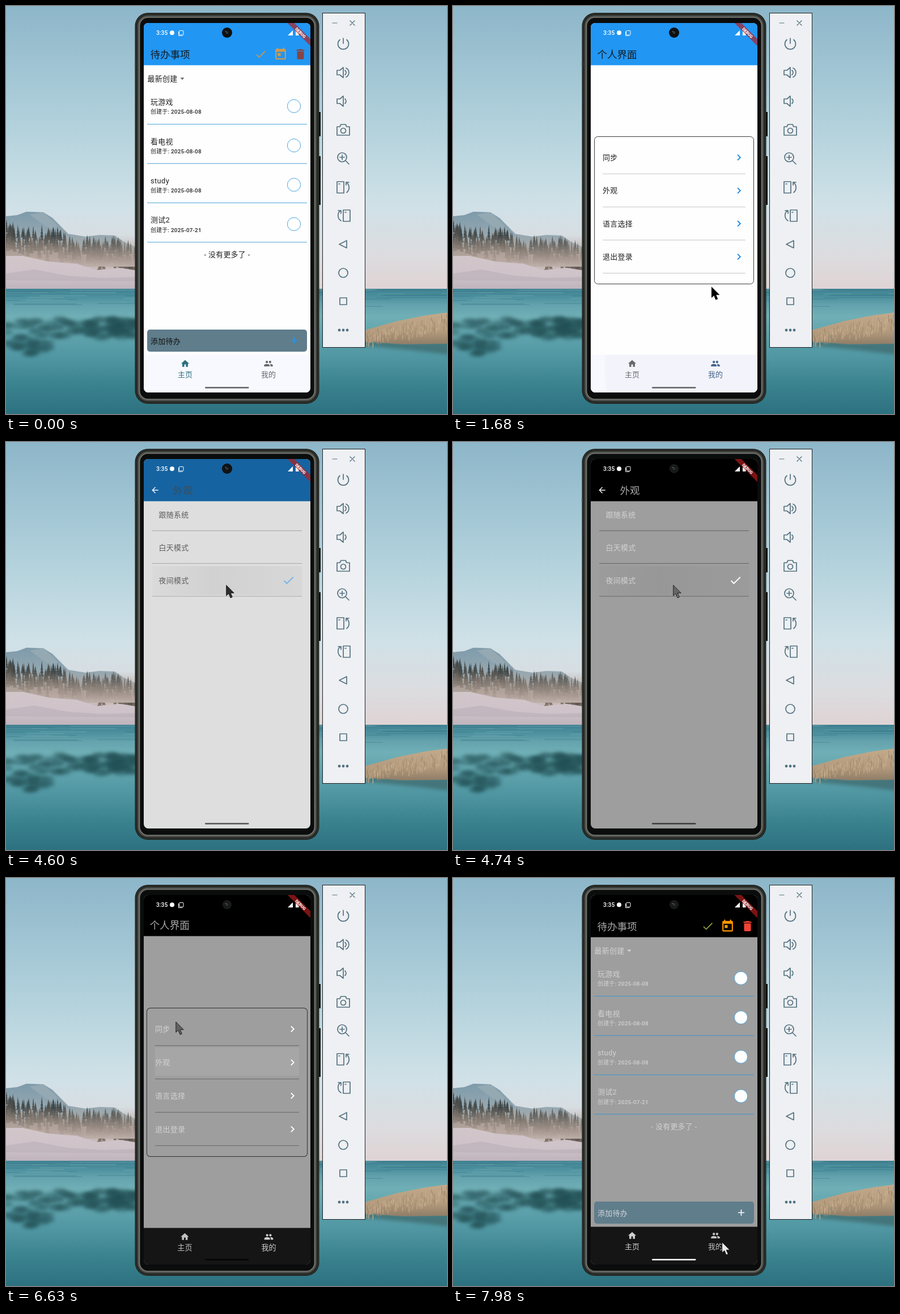
Animation, 778 px wide and 720 px high, one loop 8000 ms. Source, as an HTML page with a canvas:

```html
<!DOCTYPE html>
<html lang="zh">
<head>
<meta charset="utf-8">
<style>
html, body { margin: 0; width: 100%; height: 100%; overflow: hidden; background: #8fb7ca; }
canvas { display: block; width: 778px; height: 720px; }
</style>
</head>
<body>
<canvas id="stage" width="778" height="720"></canvas>
<script>
const W = 778, H = 720, LOOP = 8000;
const FONT = 'Roboto, "Noto Sans CJK SC", "Noto Sans CJK", sans-serif';
const stage = document.getElementById('stage').getContext('2d');
let c = stage;
let dark = 0;

const ICONS = {
  home: 'M10 20v-6h4v6h5v-8h3L12 3 2 12h3v8z',
  people: 'M16 11c1.66 0 3-1.34 3-3s-1.34-3-3-3-3 1.34-3 3 1.34 3 3 3zm-8 0c1.66 0 3-1.34 3-3S9.66 5 8 5 5 6.34 5 8s1.34 3 3 3zm0 2c-2.33 0-7 1.17-7 3.5V19h14v-2.5c0-2.33-4.67-3.5-7-3.5zm8 0c-.29 0-.62.02-.97.05 1.16.84 1.97 1.97 1.97 3.45V19h6v-2.5c0-2.33-4.67-3.5-7-3.5z',
  calendar: 'M19 3h-1V1h-2v2H8V1H6v2H5c-1.1 0-2 .9-2 2v14c0 1.1.9 2 2 2h14c1.1 0 2-.9 2-2V5c0-1.1-.9-2-2-2zm0 16H5V8h14zM7 10h5v5H7z',
  trash: 'M6 19c0 1.1.9 2 2 2h8c1.1 0 2-.9 2-2V7H6zM19 4h-3.5l-1-1h-5l-1 1H5v2h14z',
  check: 'M9 16.17L4.83 12l-1.42 1.41L9 19 21 7l-1.41-1.41z',
  chevron: 'M10 6L8.59 7.41 13.17 12l-4.58 4.59L10 18l6-6z',
  back: 'M20 11H7.83l5.59-5.59L12 4l-8 8 8 8 1.41-1.41L7.83 13H20z',
  drop: 'M7 10l5 5 5-5z',
  add: 'M19 13h-6v6h-2v-6H5v-2h6V5h2v6h6z'
};
for (const name in ICONS) ICONS[name] = new Path2D(ICONS[name]);

const clamp = v => Math.max(0, Math.min(1, v));
const span = (t, a, b) => clamp((t - a) / (b - a));
const lerp = (a, b, p) => a + (b - a) * p;

function tone(light, night) {
  const part = (hex, i) => parseInt(hex.substr(1 + i * 2, 2), 16);
  return `rgb(${[0, 1, 2].map(i => Math.round(lerp(part(light, i), part(night, i), dark)))})`;
}
function rect(x, y, w, h, fill) {
  c.fillStyle = fill;
  c.fillRect(x, y, w, h);
}
function round(x, y, w, h, r, fill, stroke, line = 1) {
  c.beginPath();
  c.roundRect(x, y, w, h, r);
  if (fill) { c.fillStyle = fill; c.fill(); }
  if (stroke) { c.strokeStyle = stroke; c.lineWidth = line; c.stroke(); }
}
function disc(x, y, r, fill, stroke) {
  c.beginPath();
  c.arc(x, y, r, 0, Math.PI * 2);
  if (fill) { c.fillStyle = fill; c.fill(); }
  if (stroke) { c.strokeStyle = stroke; c.lineWidth = 1; c.stroke(); }
}
function poly(points, fill) {
  c.beginPath();
  points.forEach(([x, y]) => c.lineTo(x, y));
  c.closePath();
  c.fillStyle = fill;
  c.fill();
}
function icon(name, x, y, size, fill) {
  c.save();
  c.translate(x - size / 2, y - size / 2);
  c.scale(size / 24, size / 24);
  c.fillStyle = fill;
  c.fill(ICONS[name]);
  c.restore();
}
function text(s, x, y, size, fill, { weight = 400, align = 'left', gap = 0 } = {}) {
  c.font = `${weight} ${size}px ${FONT}`;
  c.textAlign = align;
  c.letterSpacing = gap + 'px';
  c.fillStyle = fill;
  c.fillText(s, x, y + size * 0.37);
}
const body = (s, x, y, fill, align) => text(s, x, y, 12.9, fill, { align, gap: 0.35 });

function vertical(y0, y1, ...stops) {
  const g = c.createLinearGradient(0, y0, 0, y1);
  stops.forEach(([p, color]) => g.addColorStop(p, color));
  return g;
}

// ---- landscape ----
function landscape() {
  let seed = 7;
  const rnd = () => (seed = (seed * 16807) % 2147483647) / 2147483647;
  const treeTop = x => 378 + x * 0.17 + 4 * Math.sin(x / 17);

  rect(0, 0, W, 500, vertical(0, 500, [0, '#8db6c9'], [0.4, '#b0d0db'], [0.7, '#cfe1e7'], [0.88, '#dcdcdf'], [1, '#dfd3d4']));
  const ridge = [[0, 371], [20, 369], [36, 363], [66, 364], [82, 374], [98, 390], [110, 402], [140, 407], [165, 404], [192, 405], [208, 416], [228, 425]];
  poly([...ridge, [240, 460], [0, 460]], vertical(362, 430, [0, '#7d9aaa'], [1, '#a2b0b6']));
  poly([[42, 368], [66, 364], [84, 380], [100, 400], [74, 392]], '#95a9b3');

  rect(0, 424, 240, 76, vertical(424, 500, [0, 'rgba(160,146,138,0)'], [0.25, '#b3a39c'], [0.5, '#c9bbba'], [1, '#cfc3c9']));
  for (let i = 0; i < 230; i++) {
    const x = rnd() * 234, depth = rnd(), top = treeTop(x) + depth * 36;
    const height = 14 + rnd() * 12, half = 2.5 + rnd() * 2.5;
    const fill = ['#3f4746', '#4d4f4b', '#5f5a53', '#756b62'][Math.min(3, Math.floor(depth * 3 + rnd()))];
    for (let k = 0; k < 4; k++) {
      c.globalAlpha = 0.85;
      const y = top + height * k / 4, w = half * (k + 1.4) / 4;
      poly([[x, y - 2], [x + w, y + height / 3], [x - w, y + height / 3]], fill);
    }
  }
  c.globalAlpha = 1;
  rect(0, 404, 240, 56, vertical(404, 460, [0, 'rgba(174,158,148,0)'], [0.5, 'rgba(174,158,148,.6)'], [1, '#bdaea9']));
  poly([[0, 441], [30, 441], [75, 451], [125, 455], [160, 466], [200, 462], [240, 468], [240, 500], [0, 500]],
    vertical(440, 500, [0, '#d1c6c9'], [0.6, '#cfc3ca'], [1, '#bfb3bb']));
  poly([[0, 472], [50, 465], [110, 476], [170, 480], [240, 478], [240, 486], [0, 484]], 'rgba(184,172,181,.5)');

  rect(0, 499, W, 221, vertical(499, 720, [0, '#3f8192'], [0.06, '#4b8f9d'], [0.13, '#64a2ad'], [0.22, '#70afb6'], [0.35, '#62a5ae'], [0.55, '#4f96a2'], [0.78, '#3a818e'], [1, '#2c7180']));
  for (let i = 0; i < 50; i++) rect(rnd() * W - 40, 500 + rnd() * rnd() * 45, 40 + rnd() * 120, 1.2, i % 3 ? 'rgba(45,108,124,.35)' : 'rgba(140,185,193,.35)');

  // blurred reflection of the trees
  c.save();
  c.filter = 'blur(3px)';
  for (let i = 0; i < 130; i++) {
    const x = rnd() * 232, reach = 26 + 34 * Math.exp(-(((x - 40) / 48) ** 2)) + rnd() * 8;
    const y = 552 + rnd() * reach;
    c.beginPath();
    c.ellipse(x, y, 12, 5, 0, 0, Math.PI * 2);
    c.fillStyle = 'rgba(36,82,86,.42)';
    c.fill();
  }
  poly([[600, 588], [700, 594], [790, 592], [790, 616], [720, 608], [600, 596]], 'rgba(55,92,94,.6)');
  c.restore();

  poly([[600, 582], [640, 570], [690, 556], [740, 546], [778, 541], [778, 596], [700, 597], [600, 590]], vertical(541, 597, [0, '#c3aa8b'], [0.6, '#b39a7c'], [1, '#8f7d67']));
  for (let i = 0; i < 260; i++) {
    const x = 633 + rnd() * 145, top = 573 - (x - 633) * 0.21 + rnd() * 24;
    rect(x, top, 1, 4 + rnd() * 7, ['#c9b091', '#a08a6d', '#bca283'][i % 3]);
  }
}

// ---- phone body and emulator panel ----
function phone() {
  rect(551, 187, 4, 43, '#111');
  rect(551, 265, 4, 86, '#111');
  round(227.5, 12, 325, 690, 23, '#1b1c1a');
  const ring = (inset, width, color) => round(227.5 + inset, 12 + inset, 325 - 2 * inset, 690 - 2 * inset, 23 - inset, null, color, width);
  ring(2, 1.5, '#343731');
  ring(6.5, 4.5, '#4a4d48');
  ring(7.8, 1.6, '#757873');
  round(237, 21.5, 306, 671, 14, '#0b0c0c');
  rect(227, 100, 2, 6, '#444');
}

function panel() {
  const ink = '#54717f';
  rect(558, 12, 76, 591, '#1c1f21');
  rect(559, 13, 74, 589, '#eef0f3');
  const draw = (x, y, d, width = 1.7) => {
    c.save();
    c.translate(x, y);
    c.strokeStyle = ink;
    c.lineWidth = width;
    c.lineJoin = c.lineCap = 'round';
    c.stroke(new Path2D(d));
    c.restore();
  };
  const speaker = 'M-11 -4h5l6 -5v18l-6 -5h-5z';
  draw(580, 30, 'M-4 0h8', 1.2);
  draw(611, 30, 'M-4 -4l8 8M4 -4l-8 8', 1.3);
  draw(595, 67, 'M0 -10v9M-6 -7.5A9.5 9.5 0 1 0 6 -7.5');
  draw(595, 117.5, speaker + 'M3 -4a5 5 0 0 1 0 8M5 -8a9 9 0 0 1 0 16');
  draw(595, 168, speaker + 'M3 -4a5 5 0 0 1 0 8');
  draw(595, 219, 'M-11 -6h5l2 -4h8l2 4h5v15h-22zM4.5 1a4.5 4.5 0 1 1 -9 0a4.5 4.5 0 1 1 9 0');
  draw(594, 267, 'M7 0a8 8 0 1 1 -16 0a8 8 0 1 1 16 0M5 6l6 6M-1 -4v8M-5 0h8');
  draw(595, 320, 'M-11 -10h12v20h-12zM-8 -6h2M5 -9a11 11 0 0 1 1 18M5 -4v-5h5');
  draw(595, 370, 'M0 -10h12v20h-12zM3 -6h2M-4 9a11 11 0 0 1 -1 -18M-9 -9h5v5');
  draw(595, 420.5, 'M6 -6.5v13l-13 -6.5z');
  draw(595, 471, 'M8 0a8 8 0 1 1 -16 0a8 8 0 1 1 16 0');
  draw(595, 521, 'M-6 -6h12v12h-12z');
  [-7, 0, 7].forEach(d => disc(595 + d, 572, 2.4, ink));
}

// ---- app pages ----
const inkColor = () => tone('#202020', '#d2d2d2');
function shell(title, x) {
  rect(243, 30, 294, 652, tone('#fefefe', '#9e9e9e'));
  rect(243, 30, 294, 74.5, tone('#2196f3', '#000000'));
  text(title, x, 85.5, 17.5, tone('#141a20', '#a8a8a8'));
}
function navBar(active, ripple) {
  rect(243, 615.5, 294, 66.5, tone('#f8f9fe', '#151515'));
  if (ripple) {
    c.save();
    c.beginPath();
    c.rect(243, 615.5, 294, 66.5);
    c.clip();
    disc(active ? 463 : 316, 640, 20 + 240 * ripple, dark ? `rgba(255,255,255,${0.07 * (1 - ripple)})` : `rgba(60,70,120,${0.09 * (1 - ripple)})`);
    c.restore();
  }
  [['home', '主页', 316], ['people', '我的', 463]].forEach(([name, label, x], i) => {
    const on = active ? '#44648a' : '#2d7080';
    const fill = i === active ? tone(on, '#d0d0d0') : tone('#68696d', '#c2c2c2');
    icon(name, x, 631, 17, fill);
    text(label, x, 650, 13, fill, { align: 'center' });
  });
}
function homePage(ripple) {
  shell('待办事项', 254.5);
  icon('check', 449.5, 85, 23, tone('#b59a5e', '#7f9433'));
  icon('calendar', 484.5, 85, 25, tone('#d29a4c', '#ff9800'));
  icon('trash', 519.5, 85, 24, tone('#874545', '#f44336'));
  const ink = inkColor();
  body('最新创建', 249.5, 128, ink);
  icon('drop', 311, 128, 17, tone('#666666', '#d8d8d8'));
  [['玩游戏', '2025-08-08'], ['看电视', '2025-08-08'], ['study', '2025-08-08'], ['测试2', '2025-07-21']].forEach(([name, date], i) => {
    const y = i * 69.4;
    body(name, 255, 169.5 + y, ink);
    text('创建于: ' + date, 255, 186.8 + y, 9.9, ink, { weight: 500, gap: 0.25 });
    disc(508, 176.7 + y, 11.6, '#fff', '#4ba3dc');
    rect(249, 208 + y, 282, 1.1, tone('#5eaddd', '#4596cc'));
  });
  body('- 没有更多了 -', 390, 438.5, ink, 'center');
  round(249, 571, 282, 39, 5, '#607d8b');
  body('添加待办', 255, 591, tone('#111111', '#d0d6da'));
  icon('add', 508.5, 590.5, 19, tone('#2196f3', '#ffffff'));
  navBar(0, ripple);
}
function profilePage(ripple, press) {
  shell('个人界面', 254.5);
  round(249.5, 230.5, 281, 260, 6, null, tone('#3c3c3c', '#303030'));
  if (press) rect(263.5, 299, 252.5, 50, dark ? `rgba(255,255,255,${0.1 * press})` : `rgba(0,0,0,${0.09 * press})`);
  ['同步', '外观', '语言选择', '退出登录'].forEach((label, i) => {
    const y = 267.3 + i * 58.4;
    body(label, 264, y, inkColor());
    icon('chevron', 504.5, y, 22, tone('#2089e0', '#ffffff'));
    rect(264, y + 28.4, 252, 1.1, tone('#cacaca', '#6c6c6c'));
  });
  navBar(1, ripple);
}
function themePage(selected, press) {
  shell('外观', 294.5);
  icon('back', 263, 85, 17, '#f4f6f8');
  if (press) {
    const g = c.createLinearGradient(258, 0, 522, 0);
    g.addColorStop(0, `rgba(0,0,0,${0.02 * press})`);
    g.addColorStop(0.4, `rgba(0,0,0,${0.06 * press})`);
    g.addColorStop(1, `rgba(0,0,0,${0.03 * press})`);
    rect(258, 219, 264, 51, g);
  }
  ['跟随系统', '白天模式', '夜间模式'].forEach((label, i) => {
    const y = 128.5 + i * 57.8;
    body(label, 269.5, y, inkColor());
    rect(258, y + 27.5, 264, 1.1, tone('#cbcbcb', '#6a6a6a'));
    if (i === selected) icon('check', 498.5, y, 24, tone('#2b8fe0', '#ffffff'));
  });
}

// Material zoom: quick start, long settling tail
const zoomCurve = p => p < 1 / 6 ? 0.4 * (p * 6) ** 3 : 0.4 + 0.6 * (1 - (1 - (p * 6 - 1) / 5) ** 4.5);
function zoomed(scale, alpha, page) {
  c.save();
  c.globalAlpha = alpha;
  c.translate(390, 356);
  c.scale(scale, scale);
  c.translate(-390, -356);
  page();
  c.restore();
}

const T = { tabMine: 1140, tapTheme: 2610, push: 2720, tapNight: 4400, night: 4530, pop: 6490, tabHome: 7200 };

function pages(t) {
  const selected = t < T.night ? 0 : 2;
  const rowPress = Math.min(span(t, T.tapTheme, T.tapTheme + 80), 1 - span(t, T.pop + 100, T.pop + 320));
  const nightPress = Math.min(span(t, T.tapNight, T.tapNight + 120), 1 - span(t, 4650, 4950));
  const profile = () => profilePage(span(t, T.tabMine, 1880), rowPress);
  const theme = () => themePage(selected, nightPress);
  if (t < T.tabMine + 70) homePage(0);
  else if (t < T.push) profile();
  else if (t < T.push + 300) {
    const p = span(t, T.push, T.push + 300), z = zoomCurve(p);
    zoomed(1 + 0.05 * z, 1, profile);
    rect(243, 30, 294, 652, `rgba(0,0,0,${0.6 * span(p, 0.2, 0.42)})`);
    const alpha = span(p, 0.125, 0.25);
    if (alpha) zoomed(0.85 + 0.15 * z, alpha, theme);
  } else if (t < T.pop) theme();
  else if (t < T.pop + 300) {
    const p = span(t, T.pop, T.pop + 300), z = zoomCurve(p);
    zoomed(1.1 - 0.1 * z, 1, profile);
    const alpha = 1 - span(p, 0.08, 0.21);
    if (alpha) zoomed(1 - 0.1 * z, alpha, theme);
  } else if (t < T.tabHome + 70) profile();
  else homePage(span(t, T.tabHome, 7970));
}

function systemLayer(t) {
  text('3:35', 265, 47.3, 10.3, '#fff', { weight: 500 });
  disc(293, 47.3, 4, '#fff');
  round(305.5, 43.5, 7.5, 7.5, 1, null, '#fff');
  rect(304, 45, 1, 7.5, 'rgba(255,255,255,.8)');
  rect(304, 52, 7.5, 1, 'rgba(255,255,255,.8)');
  poly([[497, 52], [506, 43], [506, 52]], '#fff');
  rect(511, 43, 5.5, 9, '#fff');
  rect(512.5, 42, 2.5, 1, '#fff');

  c.save();
  c.translate(537, 30);
  c.rotate(Math.PI / 4);
  rect(-30, 20, 60, 8.6, 'rgba(183,28,28,.68)');
  text('DEBUG', 0, 24.3, 7.2, '#fff', { weight: 800, align: 'center' });
  c.restore();

  disc(390, 47, 9, tone('#0a0b0c', '#060606'));
  disc(390, 47, 7, tone('#0d0f10', '#171918'), tone('#16191a', '#252827'));
  disc(390, 47, 2.4, '#2e3436');
  disc(387.5, 45, 1, '#5a6163');
  const night = t < T.pop ? '#3a3a3a' : t < 6840 ? '#040404' : '#ffffff';
  round(351, 672.2, 77.5, 2.5, 1.2, tone('#606064', night));
}

// ---- pointer: [time, x, y] ----
const PATH = [
  [120, 665, 704], [530, 438, 639], [730, 441, 638], [940, 458, 633], [1540, 458, 633],
  [1680, 456, 496], [1880, 372, 334], [1950, 372, 334], [2150, 372, 321], [2350, 372, 320],
  [3200, 372, 320], [3410, 372, 288], [3800, 372, 288], [4130, 394, 251], [4400, 394, 251],
  [4600, 388, 252], [5060, 388, 252], [5200, 298, 158], [5460, 255, 88], [6020, 255, 87],
  [6460, 255, 87], [6630, 299, 252], [6960, 311, 641], [7710, 311, 641], [7830, 474, 642]
];
const ARROW = new Path2D('M0 0V18.5L4.2 14.8L7.3 22.3L10.6 21L7.5 13.7H13.5Z');

function pointer(t) {
  if (t < PATH[0][0]) return;
  const next = PATH.findIndex(key => key[0] > t);
  const b = PATH[next < 0 ? PATH.length - 1 : next];
  const a = next < 0 ? b : PATH[next - 1];
  const p = a === b ? 0 : span(t, a[0], b[0]);
  c.save();
  c.translate(lerp(a[1], b[1], p) + 0.7, lerp(a[2], b[2], p) + 0.7);
  // the pointer inverts whatever lies below it
  c.globalCompositeOperation = 'difference';
  c.fillStyle = '#fff';
  c.fill(ARROW);
  c.globalCompositeOperation = 'source-over';
  c.strokeStyle = 'rgba(0,0,0,.8)';
  c.lineWidth = 0.9;
  c.stroke(ARROW);
  c.restore();
}

const backdrop = document.createElement('canvas');
backdrop.width = W;
backdrop.height = H;
c = backdrop.getContext('2d');
landscape();
phone();
panel();
c = stage;

const start = performance.now();
function frame() {
  const t = (performance.now() - start) % LOOP;
  dark = span(t, T.night, T.night + 210);
  c.drawImage(backdrop, 0, 0);
  c.save();
  c.beginPath();
  c.roundRect(243, 30, 294, 652, 8);
  c.clip();
  pages(t);
  systemLayer(t);
  c.restore();
  pointer(t);
  requestAnimationFrame(frame);
}
frame();
</script>
</body>
</html>
```
